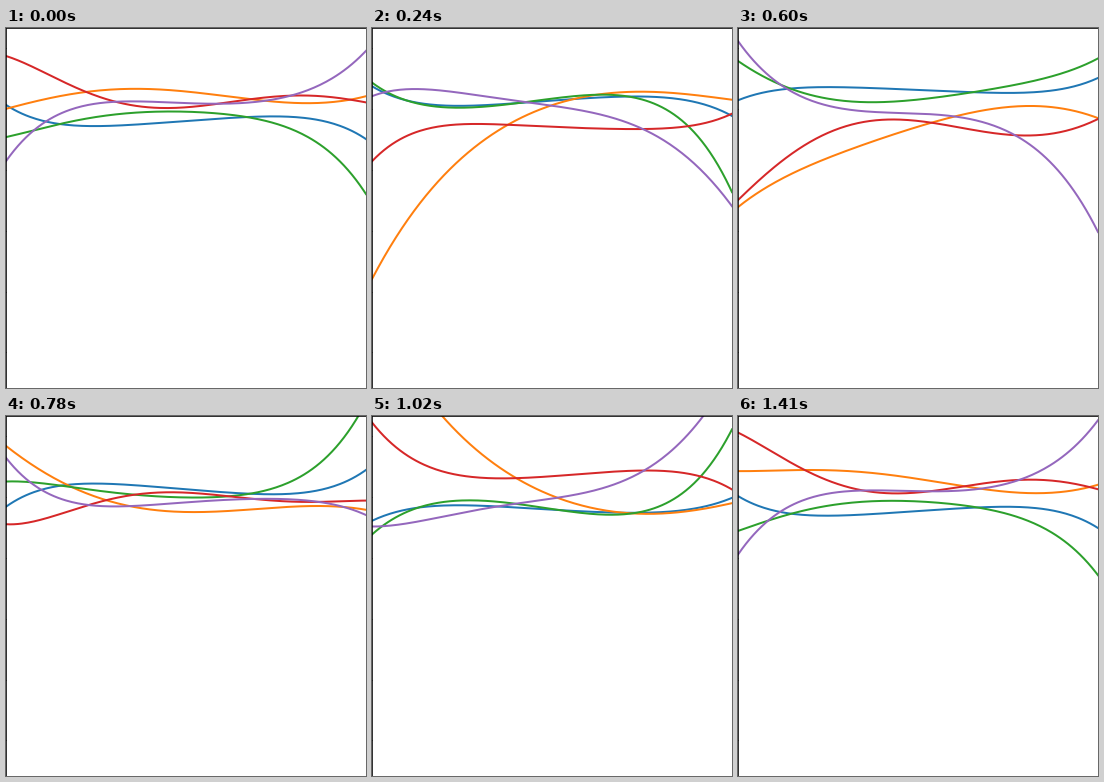
A matplotlib script that plays this animation: 360 by 360 pixels, repeating every 1.44 s.

```python
import numpy as np
from numpy.polynomial.polynomial import polyval
import matplotlib.pyplot as plt
from matplotlib.animation import FuncAnimation

SIZE, DPI = 360, 72
FRAMES, INTERVAL = 48, 30
MEAN = 80.8        # shared mean line, in pixels from the top
TICK = 60.9

# Random-looking quintics in u = -1..1, lowest power first.
# Turning the complex coefficients through one circle blends
# each curve between its real and imaginary shape.
QUINTICS = [
    [12.2 - 16.6j, -13.4 - 7.5j, 1 + 3.2j, 9.6 + 7.6j, -3.1j, 20.9 + 7.2j],
    [-17.3 + 5.8j, 17.6 - 79j, 21.9 + 75.5j, -27.3 - 12.7j,
     -10.9 + 15.4j, 3.4 - 8.2j],
    [2.9 - 13.4j, 4.8 - 29j, 28.2 - 0.8j, 2.2 + 58j,
     25.7 + 14.4j, 21.5 + 17.8j],
    [-1.5 + 21.7j, -13 + 16.8j, -50.4 + 23.8j, 61.5 - 43.2j,
     22.3 + 4.7j, -25.3 - 14.5j],
    [-5.7 - 0.3j, 6.7 + 26j, -10.6 + 20.4j, -39.7 + 71.5j,
     13.5 + 30.5j, -22.2 - 2.1j],
]

u = np.linspace(-1, 1, 181)
x = (u + 1) * SIZE / 2
curves = [polyval(u, coefs) for coefs in QUINTICS]

fig = plt.figure(figsize=(SIZE / DPI, SIZE / DPI), dpi=DPI)
ax = fig.add_axes([0, 0, 1, 1])
ax.set_xlim(0, SIZE)
ax.set_ylim(SIZE - MEAN, -MEAN)
ax.set_xticks([])
ax.set_yticks(TICK * np.arange(-1, 5))
lines = [ax.plot(x, curve.real, lw=2)[0] for curve in curves]


def update(frame):
    turn = np.exp(-2j * np.pi * frame / FRAMES)
    for line, curve in zip(lines, curves):
        line.set_ydata((curve * turn).real)
    return lines


anim = FuncAnimation(fig, update, frames=FRAMES, interval=INTERVAL,
                     repeat=True, repeat_delay=0)
plt.show()
```
